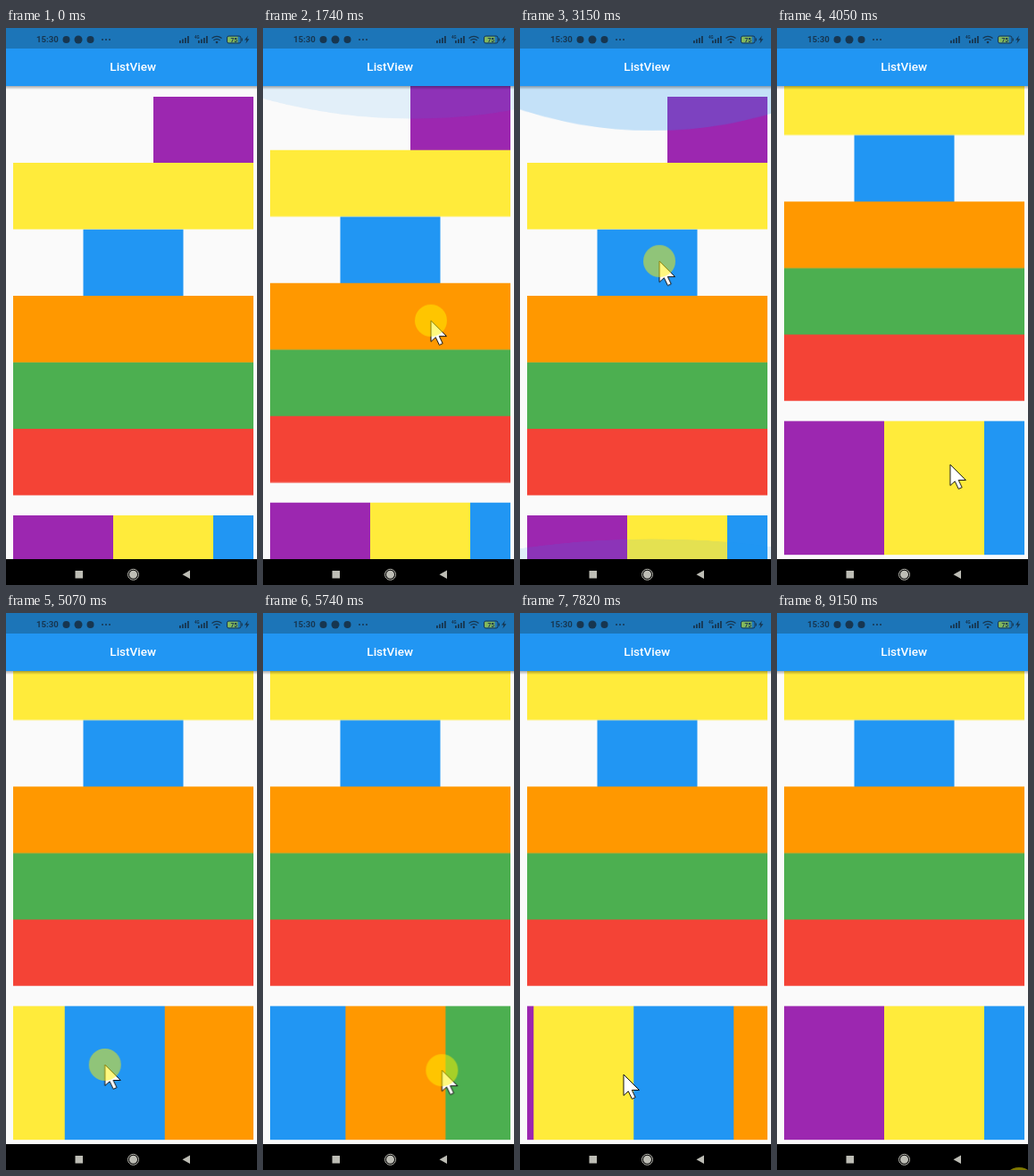
Write an HTML page that moves like this. It is 281 px wide and 624 px high and loops after 9.22 s.

```html
<!DOCTYPE html>
<html lang="en">
<head>
<meta charset="utf-8">
<title>ListView</title>
<style>
  html, body { margin: 0; width: 100%; height: 100%; overflow: hidden; background: #fafafa; }
  #stage { display: block; width: 281px; height: 624px; }
  text { font-family: Roboto, sans-serif; }

  .purple { fill: #9c27b0; }
  .yellow { fill: #ffeb3b; }
  .blue   { fill: #2196f3; }
  .orange { fill: #ff9800; }
  .green  { fill: #4caf50; }
  .red    { fill: #f44336; }
  .ink { fill: #173650; }
  .line { fill: none; stroke: #173650; }

  .anim { animation: 9220ms linear infinite; transform-origin: 0 0; }
  #page { animation-name: page; }
  #row { animation-name: row; }
  #pointer { animation-name: pointer; }
  #press { animation-name: press; animation-timing-function: step-end; }
  #glowTop { animation-name: glow-top; }
  #glowBottom { animation-name: glow-bottom; }
  #glowLeft { animation-name: glow-left; }

  /* vertical list offset */
  @keyframes page {
    0%, 11.39% { transform: translateY(0); }
    13.88% { transform: translateY(-46px); }
    16.59%, 17.9% { transform: translateY(0); }
    18.87% { transform: translateY(-14px); }
    23.1%, 27.11% { transform: translateY(-105.6px); }
    31.45%, 35.47% { transform: translateY(0); }
    38.39%, 100% { transform: translateY(-105.6px); }
  }

  /* horizontal list offset */
  @keyframes row {
    0%, 47.94% { transform: translateX(0); }
    54.99% { transform: translateX(-166px); }
    56.94% { transform: translateX(-215px); animation-timing-function: ease-out; }
    59.65%, 61.61% { transform: translateX(-240px); }
    67.25%, 73.54% { transform: translateX(-340px); }
    76.68%, 78.31% { transform: translateX(-403px); }
    81.13% { transform: translateX(-298px); }
    84.82% { transform: translateX(-105px); }
    85.68% { transform: translateX(-74px); }
    87.64%, 100% { transform: translateX(0); }
  }

  @keyframes pointer {
    0% { transform: translate(245px, 650px); }
    .76% { transform: translate(243px, 592px); }
    4.34%, 6.07% { transform: translate(229px, 546px); }
    10.09%, 10.85% { transform: translate(207px, 344px); }
    11.39% { transform: translate(206px, 331px); }
    13.88% { transform: translate(203px, 285px); }
    16.59% { transform: translate(194px, 331px); }
    17.9% { transform: translate(190px, 342px); }
    18.87% { transform: translate(188px, 328px); }
    23.1% { transform: translate(172px, 236px); }
    26.03%, 27.11% { transform: translate(158px, 110px); }
    31.45% { transform: translate(154px, 216px); }
    34.16% { transform: translate(156px, 261px); }
    35.47% { transform: translate(158px, 275px); }
    38.39% { transform: translate(167px, 169px); }
    38.83% { transform: translate(168px, 162px); }
    42.08% { transform: translate(140px, 470px); }
    45.01% { transform: translate(225px, 500px); }
    47.72%, 47.94% { transform: translate(270px, 505px); }
    54.99% { transform: translate(111px, 506px); }
    56.94%, 58.03% { transform: translate(62px, 506px); }
    61.61% { transform: translate(212px, 512px); }
    67.25% { transform: translate(112px, 514px); }
    71.58%, 73.54% { transform: translate(185px, 515px); }
    76.68%, 78.31% { transform: translate(122px, 516px); }
    81.13% { transform: translate(227px, 516px); }
    84.38%, 85.68% { transform: translate(116px, 517px); }
    87.64% { transform: translate(190px, 517px); }
    90.02%, 92.19% { transform: translate(235px, 518px); }
    95.99% { transform: translate(269px, 575px); }
    98.48%, 100% { transform: translate(271px, 639px); }
  }

  @keyframes press {
    0%, 38.83%, 57.27%, 67.46%, 76.79%, 81.13%, 91.11% { opacity: 0; }
    10.41%, 47.72%, 61.61%, 73.54%, 78.31%, 85.68%, 97.61%, 100% { opacity: 1; }
  }

  @keyframes glow-top {
    0%, 16.59% { transform: translate(168px, 65px) scaleY(0); opacity: 0; }
    17.9% { transform: translate(168px, 65px) scaleY(.8); opacity: .18; }
    18.87% { transform: translate(168px, 65px) scaleY(.65); opacity: .11; }
    22.13% { transform: translate(168px, 65px) scaleY(0); opacity: 0; }
    31.45% { transform: translate(148px, 65px) scaleY(0); opacity: 0; }
    34.16% { transform: translate(148px, 65px) scaleY(.885); opacity: .25; }
    35.47% { transform: translate(149px, 65px) scaleY(.93); opacity: .27; }
    40.13%, 100% { transform: translate(150px, 65px) scaleY(0); opacity: 0; }
  }

  @keyframes glow-bottom {
    0%, 23.1% { transform: translate(156px, 595px) scaleY(0); opacity: 0; }
    26.03%, 27.11% { transform: translate(149px, 595px) scaleY(-.95); opacity: .27; }
    34.16% { transform: translate(148px, 595px) scaleY(-.4); opacity: .12; }
    37.5%, 38.39% { transform: translate(153px, 595px) scaleY(0); opacity: 0; }
    39.05% { transform: translate(154px, 595px) scaleY(-.4); opacity: .14; }
    42.3%, 100% { transform: translate(154px, 595px) scaleY(0); opacity: 0; }
  }

  @keyframes glow-left {
    0%, 87.64% { transform: translate(8px, 515px) scaleX(0); opacity: 0; }
    90.02%, 91.11% { transform: translate(8px, 515px) scaleX(.8); opacity: .25; }
    98.5%, 100% { transform: translate(8px, 515px) scaleX(0); opacity: 0; }
  }
</style>
</head>
<body>
<svg id="stage" viewBox="0 0 281 624">
  <defs>
    <clipPath id="body"><rect y="65" width="281" height="530"/></clipPath>
    <clipPath id="rowBox"><rect x="8" y="440.4" width="269" height="149.2"/></clipPath>
    <linearGradient id="shade" x2="0" y2="1">
      <stop offset="0" stop-color="#000" stop-opacity=".32"/>
      <stop offset="1" stop-color="#000" stop-opacity="0"/>
    </linearGradient>
  </defs>

  <rect width="281" height="624" fill="#fafafa"/>

  <g clip-path="url(#body)">
    <g id="page" class="anim">
      <rect class="purple" x="165" y="77" width="112" height="74.5"/>
      <rect class="yellow" x="8" y="151" width="269" height="74.5"/>
      <rect class="blue" x="86.5" y="225.7" width="112" height="74.6"/>
      <rect class="orange" x="8" y="300" width="269" height="74.9"/>
      <rect class="green" x="8" y="374.6" width="269" height="74.8"/>
      <rect class="red" x="8" y="449" width="269" height="74.5"/>
      <svg x="8" y="546" width="269" height="149.2">
        <g id="row" class="anim">
          <rect class="purple" width="112.2" height="150"/>
          <rect class="yellow" x="112" width="112.2" height="150"/>
          <rect class="blue" x="224" width="112.2" height="150"/>
          <rect class="orange" x="336" width="112.2" height="150"/>
          <rect class="green" x="448" width="112.2" height="150"/>
          <rect class="red" x="560" width="112" height="150"/>
        </g>
      </svg>
    </g>
    <g clip-path="url(#rowBox)">
      <circle id="glowLeft" class="anim blue" cx="-194" r="224"/>
    </g>
    <circle id="glowTop" class="anim blue" cy="-364.5" r="421"/>
    <circle id="glowBottom" class="anim blue" cy="-364.5" r="421"/>
  </g>

  <!-- app bar -->
  <rect y="65" width="281" height="4" fill="url(#shade)"/>
  <rect class="blue" y="23" width="281" height="42"/>
  <text x="142.2" y="48.3" font-size="13.5" font-weight="500" fill="#fff" text-anchor="middle">ListView</text>

  <!-- status bar -->
  <rect width="281" height="23" fill="#1c75b8"/>
  <text class="ink" x="34" y="16.3" font-size="9.6" font-weight="700">15:30</text>
  <g class="ink">
    <circle cx="67.5" cy="13" r="4"/>
    <circle cx="81" cy="13" r="4.5"/>
    <circle cx="94.5" cy="13" r="4"/>
    <circle cx="108" cy="13" r="1"/>
    <circle cx="112" cy="13" r="1"/>
    <circle cx="116" cy="13" r="1"/>
    <path d="M194 14h1.8v3H194zM197 12.5h1.8V17H197zM200 11h1.8v6H200zM203 9h1.8v8H203z"/>
    <path d="M215 14h1.8v3H215zM218 12.5h1.8V17H218zM221 11h1.8v6H221zM224 9h1.8v8H224z"/>
    <text x="211" y="12" font-size="4.5" font-weight="700">4G</text>
    <circle cx="236" cy="16" r="1.3"/>
    <path d="M271 8.5l-4 5h2.4l-1 4 4-5.2h-2.5z"/>
  </g>
  <path class="line" stroke-width="1.3" d="M230.5 11.5q5.5-4.4 11 0M232.4 13.7q3.6-2.8 7.2 0"/>
  <rect x="248" y="9.5" width="11.5" height="7" fill="#83b85c"/>
  <rect class="line" x="247.5" y="9" width="15.5" height="8" rx="2"/>
  <rect class="ink" x="263.6" y="11.5" width="1.2" height="3"/>
  <text class="ink" x="255.2" y="15.5" font-size="6.5" font-weight="700" text-anchor="middle">75</text>

  <!-- navigation bar -->
  <rect y="595" width="281" height="29"/>
  <g fill="#bdbdb5">
    <rect x="77.5" y="608" width="8.5" height="8.5"/>
    <circle cx="142.5" cy="612.3" r="4.5"/>
    <circle cx="142.5" cy="612.3" r="6" fill="none" stroke="#bdbdb5" stroke-width="1"/>
    <path d="M197.5 612.3l8.5-4.8v9.6z"/>
  </g>

  <g id="pointer" class="anim">
    <path d="M0 0V23.5L5.3 18.8 9.4 27.4 13.2 25.6 9.3 17.5H17.5Z" fill="#fff" stroke="#111" stroke-width="1"/>
    <circle id="press" class="anim" r="18" fill="#fff200" fill-opacity=".5"/>
  </g>
</svg>
</body>
</html>
```
